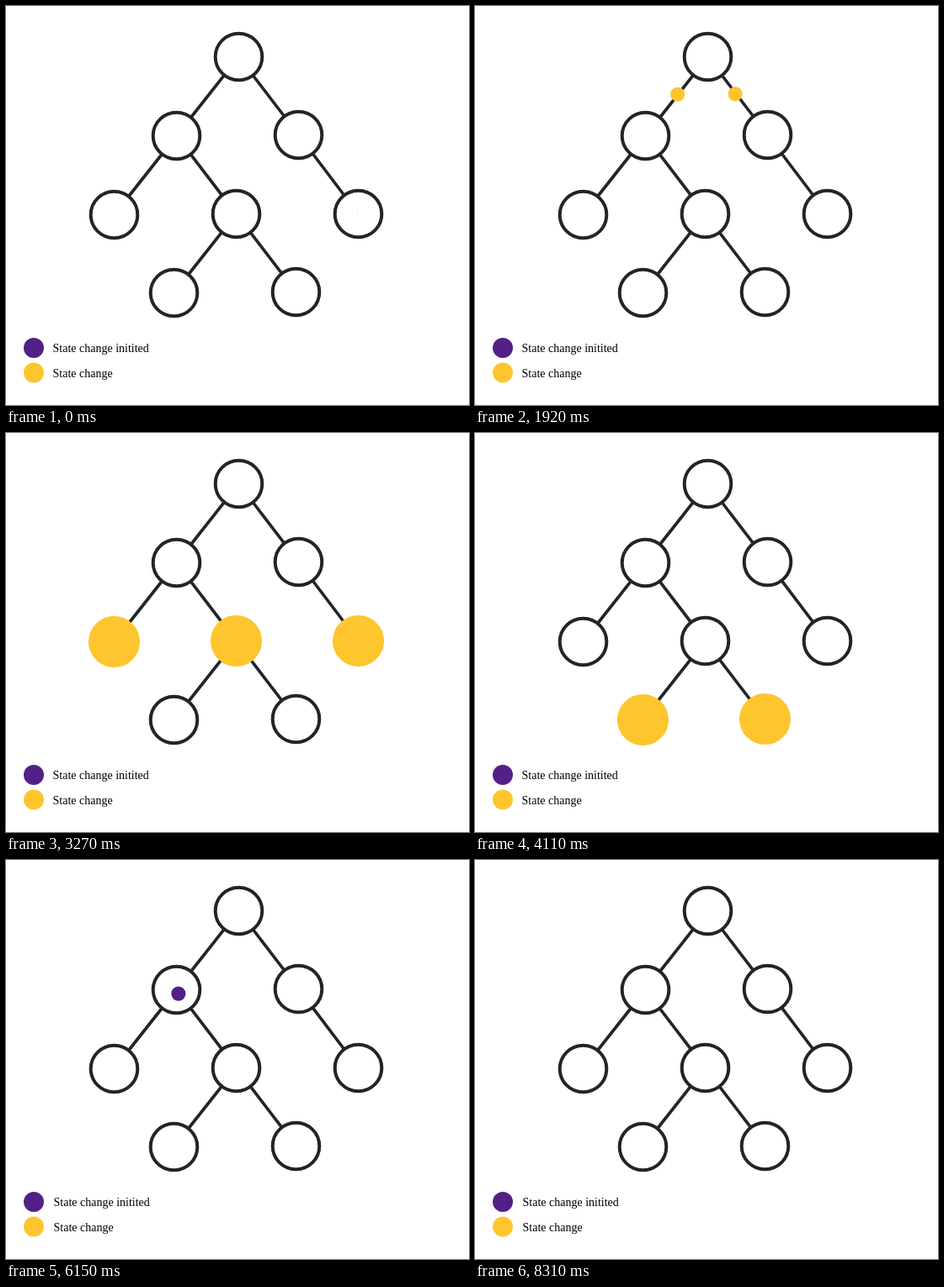
Animation of 550 by 475 pixels, one loop 8850 ms. Source, as an HTML page:

```html
<!DOCTYPE html>
<html lang="en">
<head>
<meta charset="utf-8">
<title>State change in a tree</title>
<style>
  html, body { margin: 0; width: 100%; height: 100%; overflow: hidden; background: #fff; }
  svg { display: block; width: 550px; height: 475px; }
  text { font: 14px "Liberation Serif", "Times New Roman", serif; fill: #000; }
</style>
</head>
<body>
<svg id="stage" viewBox="0 0 550 475">
  <rect y="472" width="550" height="3" fill="#fcfcfc"/>
  <g id="tree"></g>
  <circle cx="33" cy="407" r="12" fill="#522086"/>
  <circle cx="33" cy="436.5" r="12" fill="#ffc52f"/>
  <g id="legend">
    <text x="55.5" y="412">State change initited</text>
    <text x="55.5" y="442">State change</text>
  </g>
  <g id="marks"></g>
</svg>
<script>
const INK = '#212529', PURPLE = '#522086', YELLOW = '#ffc52f';
const LOOP = 8850, SECOND = 4860, STEP = 30;
const RING = 27.8, DOT = 8.6, DISC = 30.5;
const GROW = 390, LEAVE = 310, MIDWAY = 800, ARRIVE = 1368;
const PULSE = 290, TRAVEL = 588, LEVEL = PULSE + TRAVEL, FADE = 80;
const RIM = 0.243;

const nodes = {
  root: [276.5, 60.5],
  l: [202.5, 154.5], r: [347.5, 153.5],
  ll: [128.5, 248.5], lr: [273.5, 247.5], rr: [418.5, 247.5],
  lrl: [199.5, 341.5], lrr: [344.5, 340.5]
};
const children = { root: ['l', 'r'], l: ['ll', 'lr'], r: ['rr'], lr: ['lrl', 'lrr'] };
const runs = [
  { start: 0, path: ['rr', 'r', 'root'] },
  { start: SECOND, path: ['lrr', 'lr', 'l'] }
];

const $ = id => document.getElementById(id);
const clamp = x => Math.max(0, Math.min(1, x));
const ease = x => (1 - Math.cos(Math.PI * clamp(x))) / 2;
const mix = (a, b, p) => a.map((v, i) => v + (b[i] - v) * p);
// Dots run slightly left of the node centres.
const lane = id => [nodes[id][0] - 0.9, nodes[id][1] + 0.3];

function add(parent, tag, attrs) {
  const el = document.createElementNS('http://www.w3.org/2000/svg', tag);
  for (const key in attrs) el.setAttribute(key, attrs[key]);
  return parent.appendChild(el);
}

for (const id in children) {
  const [x1, y1] = nodes[id];
  for (const child of children[id]) {
    const [x2, y2] = nodes[child];
    add($('tree'), 'line', { x1, y1, x2, y2, stroke: INK, 'stroke-width': 3.7 });
  }
}
for (const [cx, cy] of Object.values(nodes)) {
  add($('tree'), 'circle', { cx, cy, r: RING, fill: '#fff', stroke: INK, 'stroke-width': 4 });
}

function spot(fill) {
  const el = add($('marks'), 'circle', { r: 0, fill });
  return (r, at) => {
    el.setAttribute('r', r);
    if (at) {
      el.setAttribute('cx', at[0]);
      el.setAttribute('cy', at[1]);
    }
  };
}

const parts = [];

function addInitiator({ start, path }) {
  const [a, b, c] = path.map(lane);
  const set = spot(PURPLE);
  parts.push(time => {
    const t = time - start;
    if (t < 0 || t >= ARRIVE) return set(0);
    const at = t < MIDWAY
      ? mix(a, b, ease((t - LEAVE) / (MIDWAY - LEAVE)))
      : mix(b, c, ease((t - MIDWAY) / (ARRIVE - MIDWAY)));
    set(Math.max(0.4, DOT * clamp(t / GROW)), at);
  });
}

function addPulse(id, start) {
  const set = spot(YELLOW);
  parts.push(time => {
    const t = time - start;
    set(DISC * ease(Math.min(t, PULSE - t) / FADE), nodes[id]);
  });
}

function addTraveller(from, to, start) {
  const set = spot(YELLOW);
  parts.push(time => {
    const p = (time - start) / TRAVEL;
    const on = p >= 0 && p < 1;
    set(on ? DOT : 0, mix(lane(from), lane(to), RIM + (1 - 2 * RIM) * p));
  });
}

// A node flashes, then passes the change on to each child.
function cascade(id, start) {
  addPulse(id, start);
  for (const child of children[id] || []) {
    addTraveller(id, child, start + PULSE);
    cascade(child, start + LEVEL);
  }
}

for (const run of runs) {
  addInitiator(run);
  cascade(run.path[2], run.start + ARRIVE);
}

function draw(time) {
  for (const part of parts) part(time);
  $('legend').setAttribute('transform', time < SECOND ? '' : 'translate(1 -.3)');
}

const origin = performance.now();
function tick() {
  const time = (performance.now() - origin) % LOOP;
  draw(Math.floor(time / STEP) * STEP);
  requestAnimationFrame(tick);
}
tick();
</script>
</body>
</html>
```
